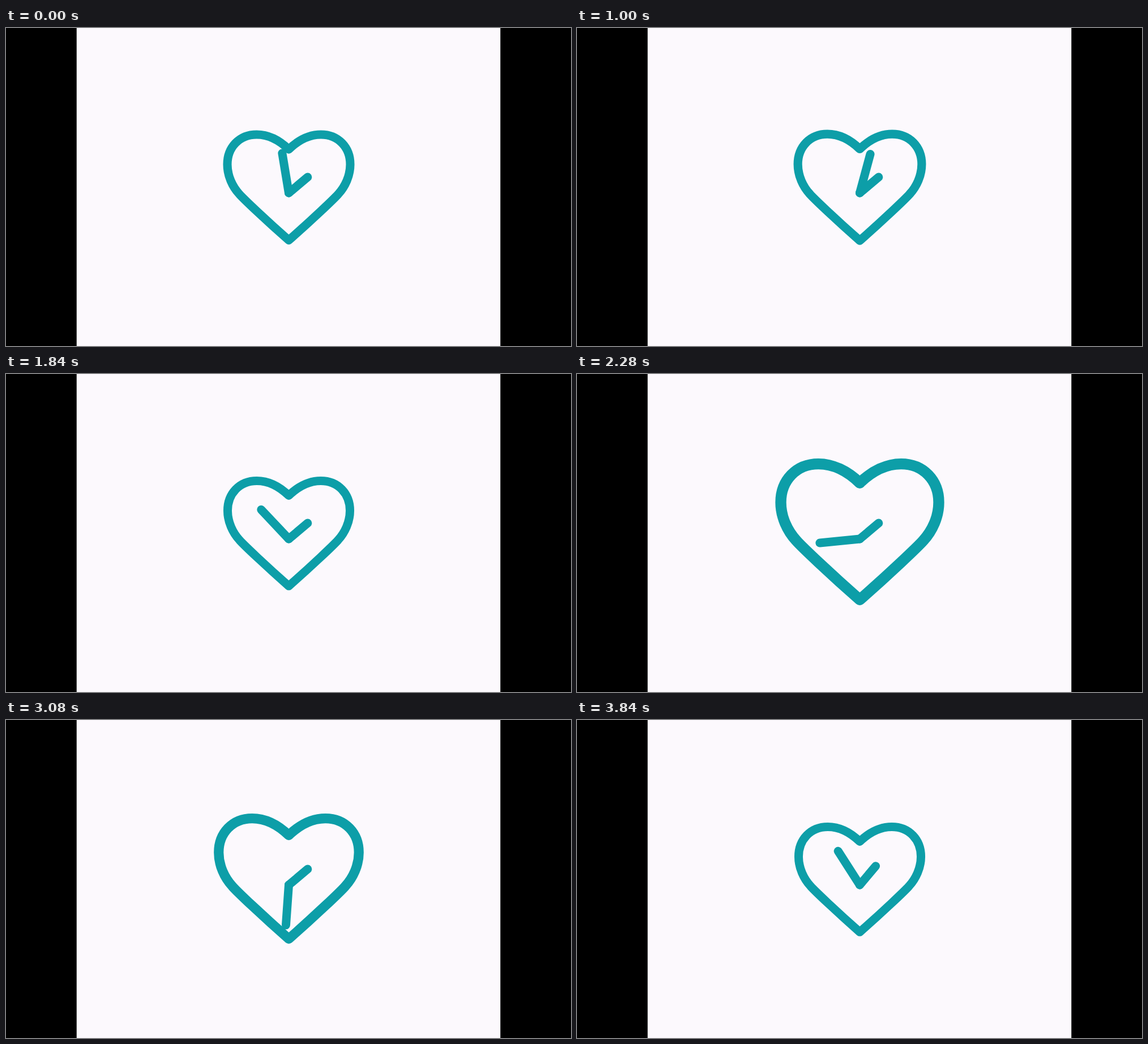
These frames come from a looping animation (998 by 561 pixels, 3.88 s). An HTML page:

```html
<!DOCTYPE html>
<html lang="en">
<head>
<meta charset="utf-8">
<title>Heart clock</title>
<style>
  html, body { margin: 0; width: 100%; height: 100%; overflow: hidden; background: #000; }
  svg { display: block; width: 998px; height: 561px; }
  .lines { fill: none; stroke: #0d9ea8; stroke-width: 15; stroke-linecap: round; stroke-linejoin: round; }
</style>
</head>
<body>
<svg viewBox="0 0 998 561">
  <rect x="124.75" width="748.5" height="561" fill="#fcf9fd"/>
  <g class="lines" transform="translate(499.5 291)">
    <path id="heart" d="M0-76.5C-17-93-37-102.5-56.5-102.5C-87-102.5-108-80-108-50C-108-30-99-11-87 2
      C-80 10-40 48 0 83C40 48 80 10 87 2C99-11 108-30 108-50C108-80 87-102.5 56.5-102.5C37-102.5 17-93 0-76.5Z"/>
    <path id="long" d="M0 0V-71"/>
    <path id="short" d="M0 0V-43.5"/>
  </g>
</svg>
<script>
const LOOP = 3880, BEAT = LOOP / 4;
const LEAD = 70; // each turn begins this many ms before the loop point

const [heart, long, short] = ["heart", "long", "short"].map(id => document.getElementById(id));
const clamp = x => Math.min(1, Math.max(0, x));
const easeOut = (x, power) => 1 - (1 - clamp(x)) ** power;

function easeInOut(x, power) {
  x = clamp(x);
  return x < 0.5 ? (2 * x) ** power / 2 : 1 - (2 - 2 * x) ** power / 2;
}

function draw(now) {
  const time = (now + LEAD) % BEAT;

  // The heart swells and shrinks symmetrically, once per beat.
  const swell = 1 - Math.abs(2 * time / BEAT - 1);
  const scale = 1 + 0.297 * easeInOut(swell, 2.8);

  // The long hand makes one turn: a quick sweep plus a slow settling.
  const turn = 0.62 * easeInOut(time / 360, 2) + 0.38 * easeOut(time / 890, 1.55);

  // The short hand flinches as the long one sets off.
  const flinch = 10 * Math.sin(Math.PI * clamp(time / LEAD));

  heart.setAttribute("transform", `scale(${scale})`);
  long.setAttribute("transform", `rotate(${360 * turn - 43.3})`);
  short.setAttribute("transform", `rotate(${50 - flinch})`);
}

function tick() {
  draw(performance.now());
  requestAnimationFrame(tick);
}

draw(0);
requestAnimationFrame(tick);
</script>
</body>
</html>
```
